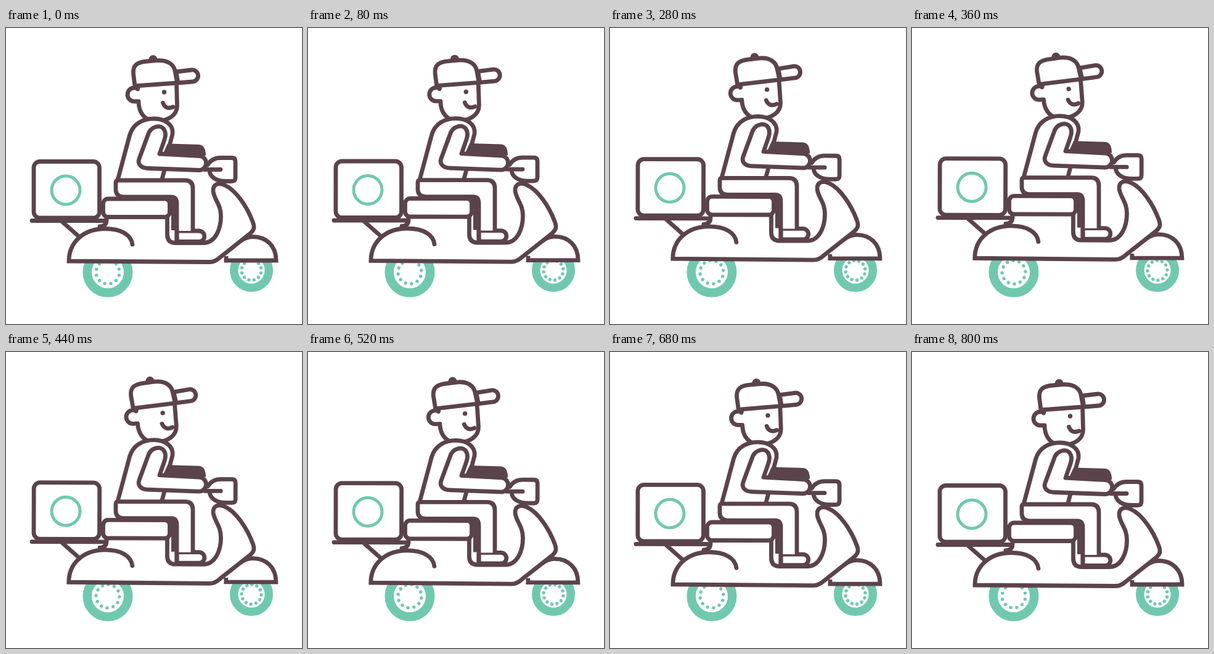
An HTML page for the animation above (840 ms loop, 480 by 480 pixels).

```html
<!DOCTYPE html>
<html lang="en">
<head>
<meta charset="utf-8">
<title>Scooter delivery</title>
<style>
  html, body { margin: 0; width: 100%; height: 100%; overflow: hidden; background: #fff; }
  svg { display: block; width: 100%; height: 100%; }
  .line { fill: #fff; stroke: #5b434c; stroke-width: 6.8; stroke-linecap: round; stroke-linejoin: round; }
  .open { fill: none; }
  .solid { fill: #5b434c; stroke: none; }
  .teal { fill: none; stroke: #70c9af; }
</style>
</head>
<body>
<svg viewBox="0 0 480 480">
  <g id="wheels"></g>

  <g id="bike" class="line">
    <!-- rack and box -->
    <path class="open" d="M92 315L117 337"/>
    <rect x="45" y="216.500" width="106.500" height="91.500" rx="10"/>
    <circle class="teal" cx="97" cy="263" r="23" stroke-width="5"/>

    <!-- front fender and bodywork -->
    <path stroke-linecap="butt" stroke-linejoin="miter" d="M380 346C386 341 393 338.500 400 338.500C422 338.500 438 353 438 377H357V370"/>
    <path stroke="none" d="M102 378C102 348 125 325.500 161 325.500H261.500V348.500H320C340 348.500 348.500 325 348.500 305C348.500 286 338 279 336 265C335 253 345 250 355 255C373 263 391 290 400 314C404 324 402 328 395 334L347 372Q339 380 330 380Z"/>
    <path class="open" stroke-linejoin="miter" d="M205 351C203 335 186 325.500 161 325.500C125 325.500 102 348 102 378L330 379.500Q339 379.500 347 372L395 334C402 328 404 324 400 314C391 290 373 263 355 255C345 250 335 253 336 265C338 279 348.500 286 348.500 305C348.500 325 340 348.500 320 348.500H275Q261.500 348.500 261.500 335V306"/>
    <path class="open" d="M42 312.500H158M163 307V312Q163 321 152 322"/>
    <rect x="157.500" y="277" width="108" height="29.500" rx="8"/>
    <path d="M327 222C332 214 340 210.500 348 210.500H366Q372 210.500 372 216.500V242.500Q372 248.500 366 248.500H357C340 248.500 330 241 330 230"/>
    <path class="open" d="M322 229.500H348"/>
  </g>

  <g id="head" class="line">
    <path d="M214 97H208A10.500 10.500 0 0 0 208 119H215C215 138 226 151 243 151C262 151 277.500 142 277.500 126L276.500 88"/>
    <path class="open" d="M213.500 95V99M254.500 121.500Q259 133 271 128"/>
    <circle class="solid" cx="256.500" cy="104" r="3.700"/>
    <circle class="solid" cx="238.500" cy="51" r="7"/>
    <path d="M276 71L301 68A9.500 9.500 0 0 1 303 87L279 89Z"/>
    <path d="M209 94L206.500 74C205.500 60 213 55 229 54L245 52.700C262 51.500 273 59 274.500 72L277.500 89Z"/>
  </g>

  <g id="rider" class="line">
    <path stroke="none" d="M181.500 245L200.500 174C206 155 222 147 240 147C258 147 272 157 270 172L253 245Z"/>
    <path class="open" d="M181.500 245L200.500 174C206 155 222 147 240 147C258 147 272 157 270 172L265 191M257 230L253 245"/>
    <path class="solid" d="M262 187.500L313 189Q324 190 324 207L254 205Z"/>
    <path d="M216 212L230 174C234 159 252 155 257 166C260 172 258 178 256 184L249 204L314 207.500A11.500 11.500 0 0 1 312 230.500L230 227.500C218 227 213 220 216 212Z"/>
    <path d="M277 329H313A8.500 8.500 0 0 1 313 346.500H277Z"/>
    <path stroke="none" d="M178 247H290Q303 247 303 260V329H277V274H190Q178 273 178 262Z"/>
    <path class="open" d="M303 328V260Q303 247 290 247H182Q178 247 178 251V262Q178 273 190 274H268Q277 274 277 285V346"/>
    <path class="solid" d="M262 273H270Q279 274 279 284V328H268V285Z"/>
  </g>
</svg>
<script>
const $ = id => document.getElementById(id);
const STEP = 40, LOOP = 840, TURN = 800;

function wheel(x, y, radius, rim, dotRing) {
  let dots = "";
  for (let i = 0; i < 12; i++) {
    const a = (i + 0.5) * Math.PI / 6;
    dots += `<circle cx="${dotRing * Math.cos(a)}" cy="${dotRing * Math.sin(a)}" r="2.7"/>`;
  }
  return `<g transform="translate(${x} ${y})">
    <circle class="teal" r="${radius - rim / 2}" stroke-width="${rim}"/>
    <g class="dots" fill="#70c9af">${dots}</g></g>`;
}

$("wheels").innerHTML = wheel(165, 396, 40.5, 14.5, 19) + wheel(398, 393, 35, 13.5, 16);
const dotRings = document.querySelectorAll(".dots");

function draw(now) {
  const t = Math.floor(now % LOOP / STEP) * STEP % TURN;
  const u = 1 - Math.abs(t / (TURN / 2) - 1);
  const lift = u * u * (3 - 2 * u);
  const shift = `translate(0 ${-4.5 * lift})`;
  $("bike").setAttribute("transform", `${shift} rotate(${0.15 * lift} 240 300)`);
  $("rider").setAttribute("transform", shift);
  $("head").setAttribute("transform", `${shift} rotate(${-3 * lift} 240 150)`);
  dotRings.forEach(d => d.setAttribute("transform", `rotate(${360 * t / TURN})`));
  requestAnimationFrame(draw);
}
requestAnimationFrame(draw);
</script>
</body>
</html>
```
